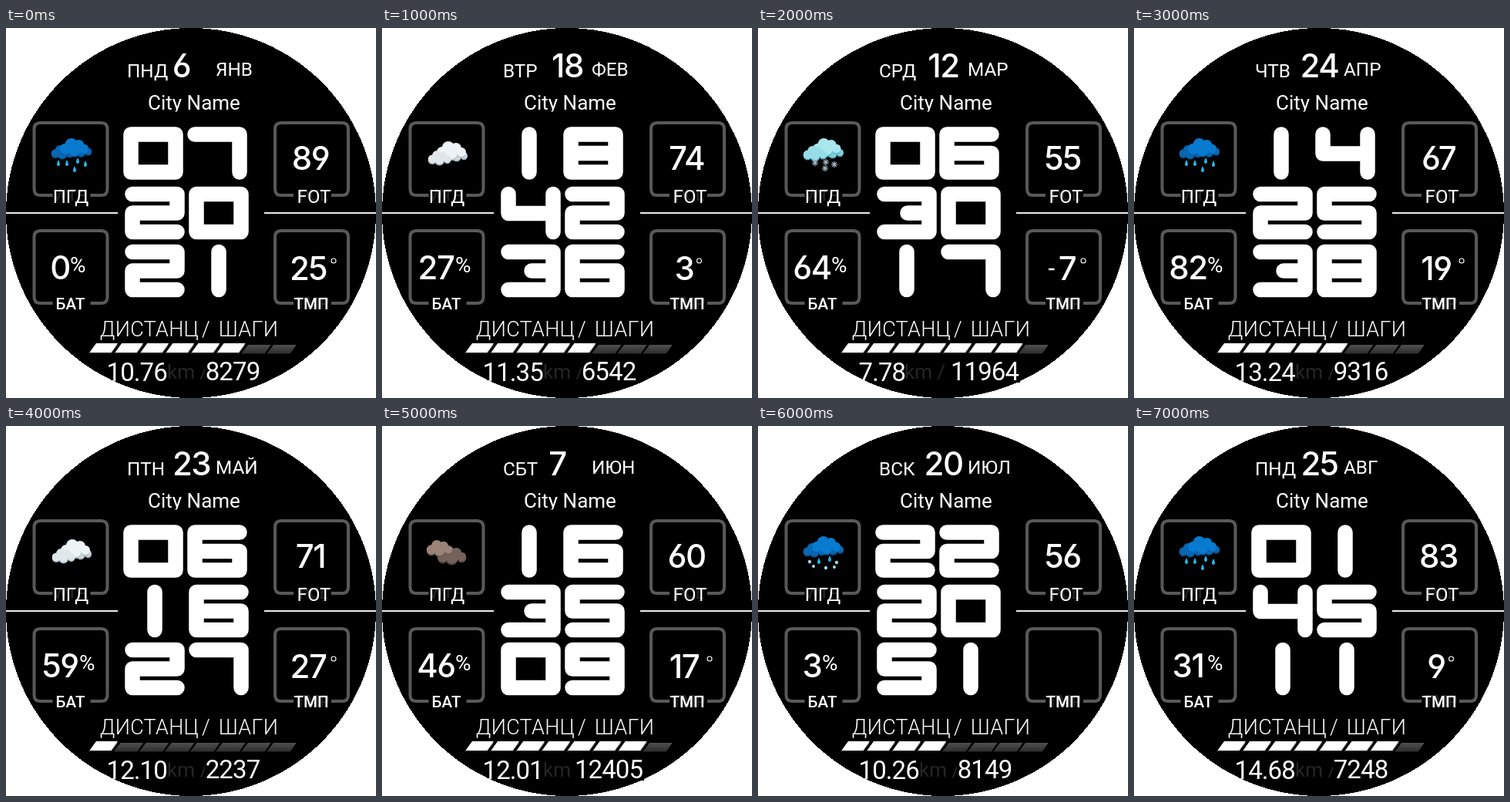
Recreate the animation shown at these times as an HTML page. Size 480x480 px, loop 8000 ms.

```html
<!DOCTYPE html>
<html lang="ru">
<head>
<meta charset="utf-8">
<title>Watch face</title>
<style>
html, body { margin: 0; width: 100%; height: 100%; overflow: hidden; background: #fff; }
svg { display: block; width: 100vw; height: 100vh; }
text { fill: #fff; font-family: Roboto, sans-serif; }
.mid { text-anchor: middle; }
.num { font: 500 42px Inter, sans-serif; font-feature-settings: "cv03", "cv04"; letter-spacing: -1.5px; }
.low { font-size: 33px; letter-spacing: -.9px; }
.day { font-size: 24.3px; }
.tag { font-size: 24px; }
.tag2 { font-size: 20.5px; font-weight: 500; }
.head { font-size: 26px; }
.title { font-size: 27px; font-weight: 300; letter-spacing: .3px; }
.ghost { fill: #242424; }
.frame { fill: none; stroke: #595959; stroke-width: 4; }
.big { fill: none; stroke: #fff; stroke-width: 19.5; stroke-linecap: round; stroke-linejoin: round; }
</style>
</head>
<body>
<svg viewBox="0 0 480 480">
  <defs>
    <clipPath id="cityClip"><rect x="170" y="80" width="150" height="28.5"/></clipPath>
    <linearGradient id="dim" x2="0" y2="1">
      <stop stop-color="#505050"/><stop offset="1" stop-color="#2c2c2c"/>
    </linearGradient>
  </defs>
  <circle cx="240" cy="240" r="240" shape-rendering="crispEdges"/>
  <g id="frames" class="frame"></g>
  <path d="M0 240H145M335 240H480" stroke="#e8eee8" stroke-width="2"/>
  <text class="head mid" x="244" y="106" clip-path="url(#cityClip)">City Name</text>
  <text class="tag2 mid ghost" x="84" y="224">WTH</text>
  <text class="tag2 mid ghost" x="399" y="224">PUL</text>
  <text class="tag2 mid ghost" x="398" y="364">TMP</text>
  <text class="tag mid" x="84" y="227">ПГД</text>
  <text class="tag mid" x="399.5" y="227">FOT</text>
  <text class="tag2 mid" x="83.5" y="365">БАТ</text>
  <text class="tag2 mid" x="396" y="365">ТМП</text>
  <text class="title mid" x="186" y="400">ДИСТАНЦ</text>
  <text class="title" x="254" y="400">/</text>
  <text class="title mid" x="314.5" y="400">ШАГИ</text>
  <g id="live"></g>
</svg>
<script>
const STEP = 1000;

// Centre lines of the block digits in a 78 x 69 cell
const GLYPHS = [
  'M10 10H68V59H10Z',
  'M39 10V59',
  'M10 10H68V34.5H10V59H68',
  'M10 10H68V59H10M40 34.5H68',
  'M10 10V35H68M68 10V59',
  'M68 10H10V34.5H68V59H10',
  'M68 10H10V59H68V34.5H10',
  'M10 10H68V59',
  'M10 10H68V59H10ZM10 34.5H68',
  'M68 34.5H10V10H68V59H10'
];
const CELLS = [[152, 128], [235, 128], [154, 205.5], [237, 205.5], [154, 280.5], [237, 280.5]];

// day, date, month, time, weather, pulse, battery, temperature, distance, steps, lit segments
const STATES = [
  ['ПНД', 6, 'ЯНВ', '072021', 'rain', 89, 0, 25, '10.76', 8279, 6],
  ['ВТР', 18, 'ФЕВ', '184236', 'cloud', 74, 27, 3, '11.35', 6542, 5],
  ['СРД', 12, 'МАР', '063017', 'snow', 55, 64, -7, '7.78', 11964, 7],
  ['ЧТВ', 24, 'АПР', '142538', 'rain', 67, 82, 19, '13.24', 9316, 5],
  ['ПТН', 23, 'МАЙ', '061627', 'cloud', 71, 59, 27, '12.10', 2237, 1],
  ['СБТ', 7, 'ИЮН', '163509', 'dust', 60, 46, 17, '12.01', 12405, 7],
  ['ВСК', 20, 'ИЮЛ', '222051', 'sleet', 56, 3, null, '10.26', 8149, 4],
  ['ПНД', 25, 'АВГ', '014511', 'rain', 83, 31, 9, '14.68', 7248, 7]
];

const text = (cls, x, y, s) => `<text class="${cls}" x="${x}" y="${y}">${s}</text>`;
const dot = (x, y, r, fill) => `<circle cx="${x}" cy="${y}" r="${r}" fill="${fill}"/>`;

function cloud(x, y, s, main, shade) {
  const puffs = c => [[8, 14, 7], [16, 8, 8], [26, 9, 7], [33, 14, 6], [20, 15, 8]]
    .map(([a, b, r]) => dot(a, b, r, c)).join('');
  return `<g transform="translate(${x} ${y}) scale(${s})"><g transform="translate(0 2)">${puffs(shade)}</g>${puffs(main)}</g>`;
}

const drop = (x, y) => `<path d="M${x + 1} ${y - 5}q4 7 0 8q-4 0 0-8" fill="#25b5e8"/>`;
const flake = (x, y, r, c) =>
  `<path d="M${x - r} ${y}h${2 * r}M${x} ${y - r}v${2 * r}M${x - r * .7} ${y - r * .7}l${r * 1.4} ${r * 1.4}M${x + r * .7} ${y - r * .7}l${-r * 1.4} ${r * 1.4}" stroke="${c}" stroke-width="1.2"/>`;

function weather(kind) {
  const blue = cloud(58, 152, .75, '#0867b3', '#064a86') + cloud(83, 150, .72, '#0867b3', '#064a86')
    + cloud(69, 143, .98, '#087bd0', '#0662ad');
  const drops = [[67, 176], [78, 176], [88, 184], [92, 173], [102, 177]];
  switch (kind) {
    case 'rain': return blue + drops.map(p => drop(...p)).join('');
    case 'sleet': return blue + drops.map(([x, y], i) =>
      i % 2 ? drop(x, y) : flake(x, y, 2.2, '#a5dcef')).join('')
      + flake(72, 182, 2, '#a5dcef') + flake(99, 183, 2, '#a5dcef');
    case 'snow': return cloud(82, 151, .74, '#7fd0de', '#4aa9bd') + cloud(70, 143, .96, '#a9e6ee', '#62bccd')
      + cloud(58, 153, .8, '#97dde8', '#55b1c4')
      + [[74, 175], [87, 182], [88, 174], [99, 177]].map(([x, y]) => flake(x, y, 4.2, '#a9b9cc')).join('');
    case 'dust': return cloud(71, 156, .98, '#75625a', '#51433d') + cloud(57, 148, .88, '#9b8377', '#6d5b52');
    default: return cloud(82, 155, .74, '#cdd8dd', '#9dabb3') + cloud(70, 147, 1, '#eef3f5', '#b5c2c9')
      + cloud(59, 159, .78, '#e0e7eb', '#a9b6be');
  }
}

function segments(lit) {
  let out = '';
  for (let i = 0; i < 8; i++) {
    const x = 106.5 + 33.1 * i;
    out += `<path d="M${x} 422.5l9-11.500h29.500l-8 11.500z" fill="url(#dim)"/>`;
    if (i < lit) out += `<path d="M${x + 2} 421l8.500-12h28l-8.500 12z" fill="#fff"/>`;
  }
  return out;
}

function temperature(t) {
  if (t === null) return '';
  const deg = t < 0 ? 422 : t < 10 ? 411.5 : 425;
  const minus = t < 0 ? '<path d="M377 313h7.5" stroke="#fff" stroke-width="2.5"/>' : '';
  return minus + text('num mid', t < 0 ? 401 : 392, 327, Math.abs(t))
    + `<circle cx="${deg}" cy="302" r="3" fill="none" stroke="#fff" stroke-width="1.1"/>`;
}

function face([day, date, month, time, sky, pulse, power, temp, dist, steps, lit]) {
  const kmX = dist.length > 4 ? 209 : 190;
  const stepX = steps > 9999 ? 250 : 258;
  const digits = [...time].map((d, i) =>
    `<path class="big" d="${GLYPHS[d]}" transform="translate(${CELLS[i]})"/>`).join('');
  return text('day', 157, 63.5, day) + text('num mid', date > 9 ? 240.5 : 227.5, 63.5, date)
    + text('day', 272, 62, month)
    + digits + weather(sky)
    + text('num mid', 395, 184, pulse)
    + text('num mid', 70, 325.5, power)
    + `<text x="${power > 9 ? 95 : 83}" y="317" font-size="28">%</text>`
    + temperature(temp) + segments(lit)
    + text('head ghost', kmX, 455, 'km /')
    + `<rect x="${stepX}" y="428" width="${2 * (295 - stepX)}" height="32"/>`
    + text('low', 130.5, 458, dist) + text('low mid', 294, 457, steps);
}

const box = (x, y) =>
  `<path d="M${x + 24} ${y + 94}H${x + 8}q-8 0-8-8V${y + 8}q0-8 8-8h79q8 0 8 8v78q0 8-8 8H${x + 73}"/>`;
document.getElementById('frames').innerHTML = box(36.5, 123) + box(36.5, 263) + box(349, 123) + box(349, 263);

const live = document.getElementById('live');
const start = performance.now();
let shown = -1;

function tick() {
  const i = Math.floor((performance.now() - start) / STEP) % STATES.length;
  if (i !== shown) {
    live.innerHTML = face(STATES[i]);
    shown = i;
  }
  requestAnimationFrame(tick);
}
tick();
</script>
</body>
</html>
```
